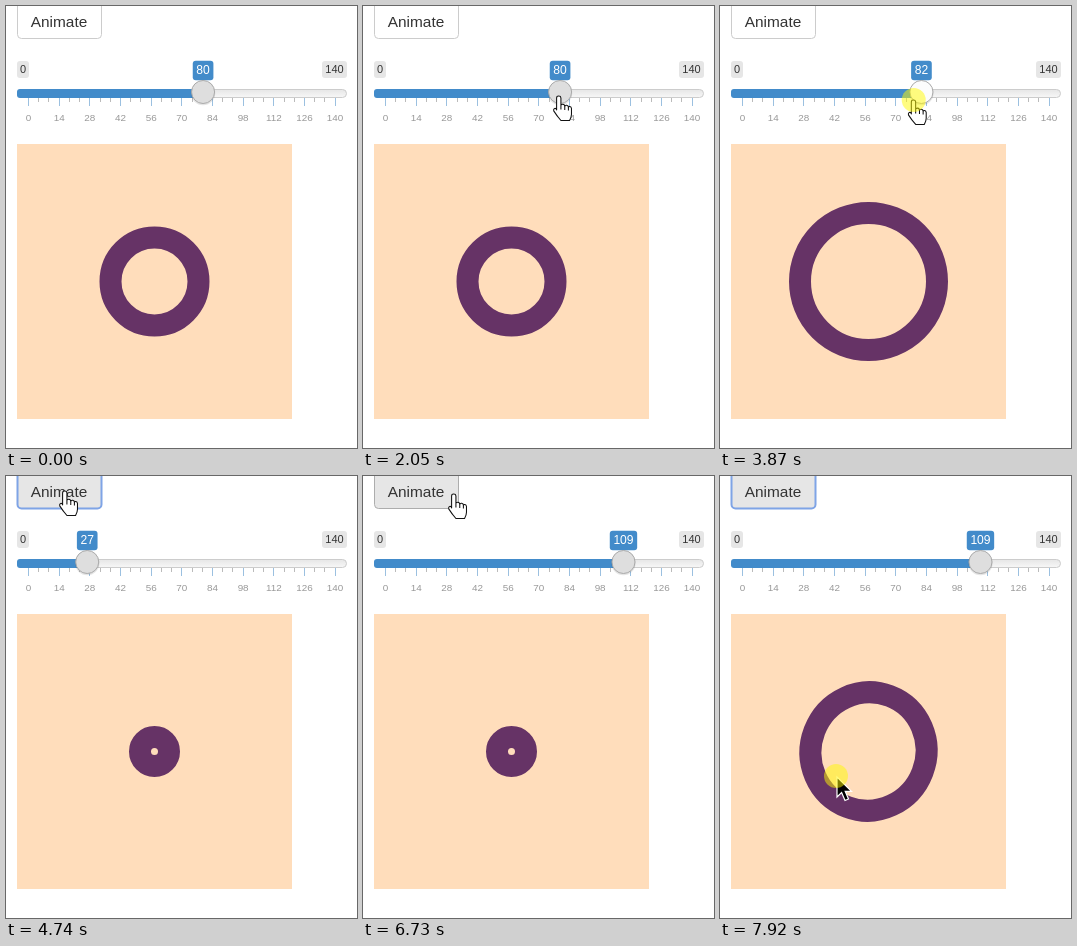
Write an HTML page that moves like this. It is 351 px wide and 442 px high and loops after 8000 ms.

```html
<!DOCTYPE html>
<html lang="en">
<head>
<meta charset="utf-8">
<title>Ring size slider</title>
<style>
  html, body { margin: 0; width: 100%; height: 100%; overflow: hidden; background: #fff; }
  svg { display: block; font-family: "Liberation Sans", Arial, sans-serif; fill: #333; }
  text { text-anchor: middle; }
  #grid text { font-size: 9.9px; fill: #999; }
  .limit { font-size: 11px; }
</style>
</head>
<body>
<svg width="351" height="442" viewBox="0 0 351 442">
  <defs>
    <linearGradient id="track" x2="0" y2="1">
      <stop stop-color="#e6e6e6"/>
      <stop offset="1" stop-color="#f7f7f7"/>
    </linearGradient>
  </defs>

  <rect id="button" x="11.5" y="-6.5" width="84" height="39" rx="4"/>
  <text x="53" y="21" font-size="15.4">Animate</text>

  <g class="limit">
    <rect x="11" y="55" width="12" height="17" rx="3" fill="#e6e6e6"/>
    <text x="17" y="67">0</text>
    <rect x="316" y="55" width="25" height="17" rx="3" fill="#e6e6e6"/>
    <text x="328.5" y="67">140</text>
  </g>
  <g id="grid"></g>
  <rect x="11.5" y="83.5" width="329" height="8" rx="4" fill="url(#track)" stroke="#ccc"/>
  <rect id="bar" x="11" y="83" height="9" rx="3" fill="#428bca"/>
  <g id="handle">
    <rect id="tag" y="54.8" height="19.4" rx="3" fill="#428bca"/>
    <text id="value" y="68" font-size="12.1" style="fill:#fff"></text>
    <circle cy="87" r="12.2" opacity=".12"/>
    <circle id="knob" cy="86" r="11.5" stroke="#aaa"/>
  </g>

  <rect x="11" y="138" width="275" height="275" fill="#fdb"/>
  <ellipse id="ring" fill="none" stroke="#636" stroke-width="22"/>

  <g id="cursor">
    <path id="arrow" transform="translate(1 1)" fill="#000" stroke="#fff" stroke-width="1.2"
      d="M0 0V20L4.6 15.6 8 23.5 11.5 22 8.2 14.3H14.5Z"/>
    <path id="hand" transform="scale(.96)" fill="#fff" stroke="#111" stroke-width="1.1" stroke-linejoin="round"
      d="M-2.5 2Q-2.5 0-.3 0T2 2V10Q2 8.5 4 8.5T6 11Q6.2 9.5 8 9.7T9.8 12Q10 10.8 11.4 11T13 13V19Q13 22 11 25.5H2Q-2 21-5.5 15.5Q-6 13.5-4.5 13T-2.5 14.5ZM2 10V14M6 11V14.5M9.8 12V15"/>
    <circle id="press" r="12" fill="rgb(255,250,0)" opacity=".5"/>
  </g>
</svg>
<script>
const LOOP = 8000, START = 300;
const STEP = 79.4;
const LEAD = 14;    // the pointer runs ahead of the handle
const $ = id => document.getElementById(id);
const set = (id, attrs) => {
  for (const key in attrs) $(id).setAttribute(key, attrs[key]);
};
const show = (id, on) => set(id, { visibility: on ? 'visible' : 'hidden' });
const ease = p => Math.sin(Math.min(1, p) * Math.PI / 2);
const sliderX = v => 22.7 + 2.186 * v;

// Pointer moves: start, end, x, y and the slider value when dragging.
const moves = [
  [300, 700, 130, 273],
  [940, 1010, 148, 280],
  [1420, 2060, 196, 90],
  [2130, 2290, 221, 86, 90],
  [3005, 3330, 306, 88, 129],
  [3736, 4190, 81, 100, 27],
  [4260, 4720, 59, 15],
  [4820, 5200, 146, 272],
  [5390, 5700, 82, 87],
  [5780, 6180, 261, 87, 109],
  [6250, 6700, 91, 18],
  [6890, 7450, 116, 300]
];
// The ring follows the slider late, in jumps: time, value.
const sizes = [[0, 80], [2990, 90], [3540, 129], [4330, 21], [6880, 110]];
const holds = [[2120, 4250], [5770, 6250]];
const clicks = [[1010, 1320], [5210, 5390], [7510, LOOP]];
const focus = [[4730, 5770], [6800, LOOP]];

const spanAt = (spans, t) => spans.find(([from, to]) => t >= from && t < to);

function pose(t) {
  let now = [257, 408, 80];
  for (const [from, to, ...goal] of moves) {
    if (t < from) break;
    const p = ease((t - from) / (to - from));
    now = now.map((v, i) => v + ((goal[i] ?? v) - v) * p);
  }
  return now;
}

function buildGrid() {
  let out = '';
  for (let i = 0; i <= 30; i++) {
    const x = 22.5 + i * 10.22, big = i % 3 === 0;
    out += `<rect x="${Math.floor(x)}" y="92" width="1" height="${big ? 8 : 4}" fill="${big ? '#9bc0e0' : '#bbb'}"/>`;
    if (big) out += `<text x="${x}" y="115">${i / 3 * 14}</text>`;
  }
  $('grid').innerHTML = out;
}

function drawSlider(v, held) {
  const x = sliderX(v), tagWidth = String(v).length * 6.73 + 7.2;
  set('handle', { transform: `translate(${x - .5})` });
  set('tag', { x: -tagWidth / 2, width: tagWidth });
  $('value').textContent = v;
  set('bar', { width: x - 11 });
  set('knob', { fill: held ? '#fcfcfc' : '#dedede' });
}

function drawRing(t, click) {
  const r = sizes.filter(([from]) => from <= t).pop()[1] / 2 + 4;
  const squash = click ? 3 * Math.sin((t - click[0]) / 480 * Math.PI) : 0;
  set('ring', {
    rx: r - .9 * squash, ry: r + .3 * squash,
    transform: `translate(148.5 275.5) rotate(${squash ? 21 : 0})`
  });
}

function draw(now) {
  const t = Math.max(0, START + STEP * Math.floor((now - START + 10) / STEP));
  const visible = now >= START - 10;
  const v = Math.round(pose(t)[2]), [x, y] = pose(t + LEAD);
  const held = spanAt(holds, t), click = spanAt(clicks, t), focused = spanAt(focus, t);
  const onButton = visible && x < 96 && y < 33;
  const onKnob = Math.hypot(x - sliderX(v), y - 86) < 15;
  const hand = held || onButton || onKnob;

  set('button', {
    fill: onButton || focused ? '#e6e6e6' : '#fff',
    stroke: focused ? '#7fa4e6' : onButton ? '#adadad' : '#ccc',
    'stroke-width': focused ? 2 : 1
  });
  drawSlider(v, held);
  drawRing(t, click);
  set('cursor', { transform: `translate(${x} ${y})`, display: visible ? 'inline' : 'none' });
  show('arrow', !hand);
  show('hand', hand);
  show('press', held || click);
}

buildGrid();
const begin = performance.now();
function tick() {
  draw((performance.now() - begin) % LOOP);
  requestAnimationFrame(tick);
}
tick();
</script>
</body>
</html>
```
